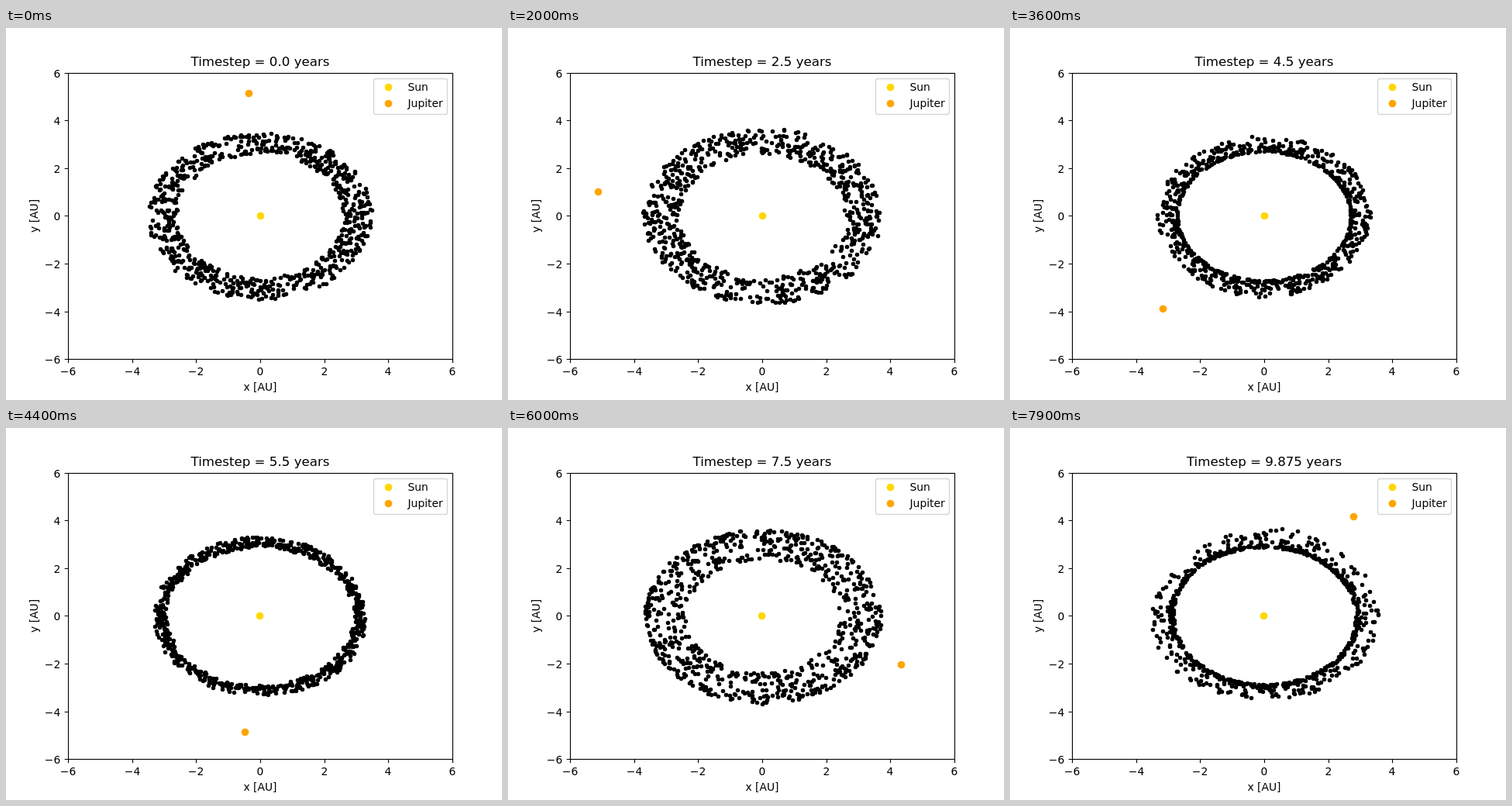
These frames come from a looping animation (640x480 px, 8000 ms). An HTML page:

```html
<!DOCTYPE html>
<html lang="en">
<head>
<meta charset="utf-8">
<title>Asteroid belt</title>
<style>
  html, body { margin: 0; width: 100%; height: 100%; overflow: hidden; background: #fff; }
  svg { display: block; width: 640px; height: 480px; }
  text { font: 13.89px "DejaVu Sans", sans-serif; fill: #000; }
  .title { font-size: 16.67px; }
  .middle { text-anchor: middle; }
  .end { text-anchor: end; }
  .axis { fill: none; stroke: #000; stroke-width: 1.11; }
</style>
</head>
<body>
<svg viewBox="0 0 640 480">
  <path id="belt" fill="none" stroke="#000" stroke-width="5.56" stroke-linecap="round"/>
  <circle id="sun" r="4.86" fill="#ffd700"/>
  <circle id="jupiter" r="4.86" fill="#ffa500"/>
  <g id="axes"><rect class="axis" x="80.5" y="58.5" width="496" height="369"/></g>
  <text id="title" class="title middle" x="328" y="49"></text>
  <text class="middle" x="328" y="468">x [AU]</text>
  <text class="middle" transform="translate(41 242.4) rotate(-90)">y [AU]</text>
  <rect x="474.5" y="65.5" width="95" height="46" rx="2.8" fill="#fff" fill-opacity=".8"
        stroke="#ccc" stroke-opacity=".8" stroke-width="1.39"/>
  <circle cx="493.5" cy="76.5" r="4.86" fill="#ffd700"/>
  <circle cx="493.5" cy="97.5" r="4.86" fill="#ffa500"/>
  <text x="518.5" y="81">Sun</text>
  <text x="518.5" y="102">Jupiter</text>
</svg>
<script>
const STEPS = 80, STEP_MS = 100, DT = 0.125;   // DT in years
const GM = 40, MASS_RATIO = 0.00095, COUNT = 800;
const INNER = 2.59, OUTER = 3.5;               // AU

const $ = id => document.getElementById(id);
const snap = v => Math.round(v) + 0.5;
const px = x => snap(328 + x * 41.333);
const py = y => snap(242.4 - y * 30.8);

function addAxes() {
  let marks = "";
  for (let v = -6; v <= 6; v += 2) {
    const x = px(v), y = py(v), label = String(v).replace("-", "\u2212");
    marks += `<path class="axis" d="M${x} 427.5v4.86M80.5 ${y}h-4.86"/>
      <text class="middle" x="${x - 0.5}" y="448">${label}</text>
      <text class="end" x="70.3" y="${y + 5}">${label}</text>`;
  }
  $("axes").insertAdjacentHTML("beforeend", marks);
}

function makeRandom(seed) {
  return () => {
    seed = (seed + 0x6d2b79f5) | 0;
    let n = Math.imul(seed ^ (seed >>> 15), 1 | seed);
    n = (n + Math.imul(n ^ (n >>> 7), 61 | n)) ^ n;
    return ((n ^ (n >>> 14)) >>> 0) / 4294967296;
  };
}

// Kepler orbit as a series in the eccentricity
function jupiterAt(years) {
  const rad = Math.PI / 180, a = 5.012, e = 0.047;
  const m = 32.5 * rad * (years - 7.15);
  const angle = 322.4 * rad + m + 2 * e * Math.sin(m) + 1.25 * e * e * Math.sin(2 * m);
  const r = a * (1 - e * Math.cos(m) + e * e / 2 * (1 - Math.cos(2 * m)));
  return { x: r * Math.cos(angle), y: r * Math.sin(angle) };
}

// The sun starts at rest and is slowly pulled along by Jupiter
function sunAt(years) {
  const start = jupiterAt(0), now = jupiterAt(years);
  return {
    x: -0.0026 * years - MASS_RATIO * (now.x - start.x),
    y: -MASS_RATIO * (now.y - start.y)
  };
}

function makeBelt() {
  const random = makeRandom(11);
  return Array.from({ length: COUNT }, () => {
    const r = INNER + (OUTER - INNER) * random();
    const angle = 2 * Math.PI * random(), speed = Math.sqrt(GM / r);
    const c = Math.cos(angle), s = Math.sin(angle);
    return { x: r * c, y: r * s, vx: -speed * s, vy: speed * c };
  });
}

// Semi-implicit Euler: move first, then update the velocity
function advance(body, jupiter) {
  body.x += body.vx * DT;
  body.y += body.vy * DT;
  const dx = jupiter.x - body.x, dy = jupiter.y - body.y;
  const sunPull = GM * DT / Math.hypot(body.x, body.y) ** 3;
  const jupiterPull = GM * MASS_RATIO * DT / Math.hypot(dx, dy) ** 3;
  body.vx += jupiterPull * dx - sunPull * body.x;
  body.vy += jupiterPull * dy - sunPull * body.y;
}

function simulate() {
  const belt = makeBelt(), paths = [];
  for (let step = 0; step < STEPS; step++) {
    paths.push(belt.map(b => `M${px(b.x)} ${py(b.y)}h0`).join(""));
    const jupiter = jupiterAt((step + 1) * DT);
    belt.forEach(b => advance(b, jupiter));
  }
  return paths;
}

function place(id, point) {
  $(id).setAttribute("cx", px(point.x));
  $(id).setAttribute("cy", py(point.y));
}

function draw(step) {
  const years = step * DT;
  $("belt").setAttribute("d", beltPaths[step]);
  place("sun", sunAt(years));
  place("jupiter", jupiterAt(years));
  $("title").textContent = `Timestep = ${Number.isInteger(years) ? years.toFixed(1) : years} years`;
}

addAxes();
const beltPaths = simulate();
const startTime = performance.now();
let shown = -1;

function tick() {
  const elapsed = Math.max(0, performance.now() - startTime);
  const step = Math.floor(elapsed / STEP_MS) % STEPS;
  if (step !== shown) draw(shown = step);
  requestAnimationFrame(tick);
}
tick();
</script>
</body>
</html>
```
